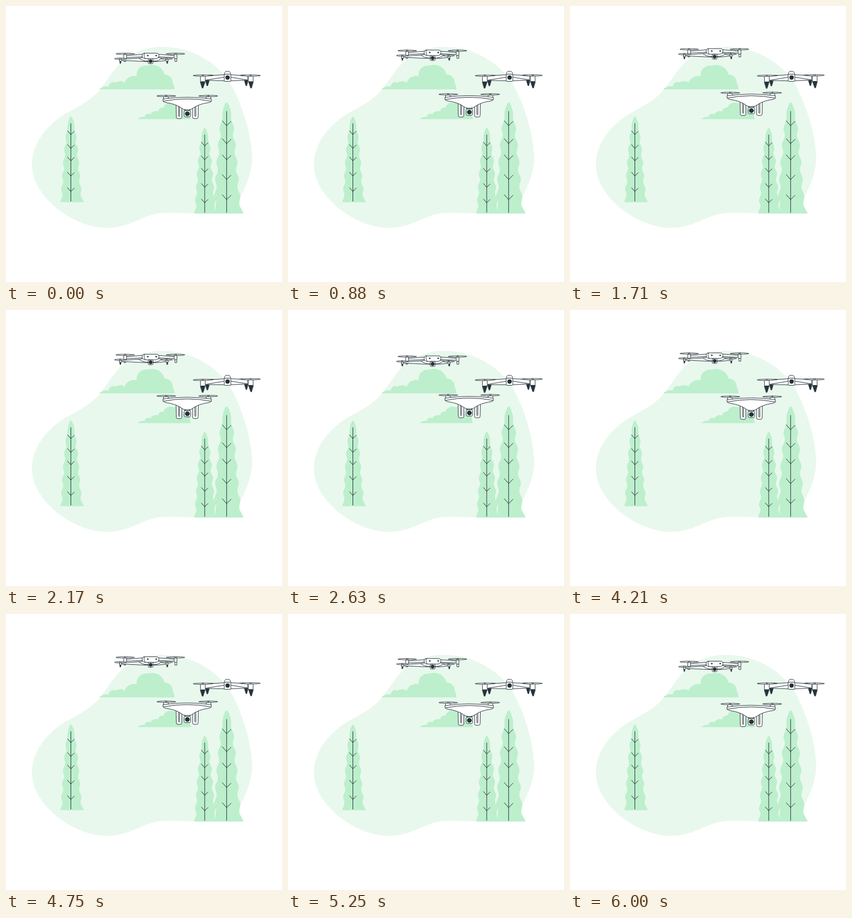
Animation, 500 px wide and 500 px high, one loop 6.04 s. Source, as an HTML page:

```html
<!DOCTYPE html>
<html lang="en">
<head>
<meta charset="utf-8">
<title>Drones</title>
<style>
  html, body { margin: 0; width: 100%; height: 100%; overflow: hidden; background: #fff; }
  svg { display: block; width: 100vw; height: 100vh; }
  .leaf { fill: #bdefcd; }
  .line { fill: none; stroke: #263238; stroke-width: 1; stroke-linecap: round; stroke-linejoin: round; }
  .drone { fill: #fff; stroke: #263238; stroke-width: .95; stroke-linecap: round; stroke-linejoin: round; }
  .dark { fill: #263238; }
  .blade { stroke-width: .9; }
</style>
</head>
<body>
<svg viewBox="0 0 500 500">
  <path fill="#e8f8ed" d="M283 74C345 74 392 112 410 146C431 186 446 240 446 274C446 298 438 319 427 341C415 364 400 376 378 376C345 377 300 373 275 376C245 380 225 402 182 402C125 402 47 348 47 287C47 248 76 214 108 195C133 181 152 172 168 154C186 133 196 110 218 94C236 81 258 74 283 74Z"/>
  <path class="leaf" d="M169 151C174 146 180 144 186 146C187 139 193 136 199 139C204 135 212 136 215 139C217 131 227 125 237 127C235 116 244 107 255 108C268 104 284 109 287 124C296 124 303 132 302 140C304 143 306 147 305 151Z"/>
  <path class="leaf" d="M238 205C242 201 247 200 251 201C252 196 257 194 262 196C264 191 271 189 276 191C276 186 281 183 286 184C287 177 295 173 303 176C312 174 321 180 321 188C329 187 335 193 333 199L335 205Z"/>
  <g id="trees"></g>
  <path fill="none" stroke="#e8f8ed" stroke-width="1.6" d="M381 353Q377 361 380 368"/>
  <g id="front" class="drone"></g>
  <g id="side" class="drone"></g>
  <g id="back" class="drone"></g>
</svg>
<script>
const LOOP = 6040;
const CYCLE = 6000;
const byId = id => document.getElementById(id);

const path = (d, cls = '') => `<path class="${cls}" d="${d}"/>`;
const box = (x, y, w, h, r = 0, cls = '') =>
  `<rect class="${cls}" x="${x}" y="${y}" width="${w}" height="${h}" rx="${r}"/>`;
const dot = (x, y, r) => `<circle class="dark" cx="${x}" cy="${y}" r="${r}"/>`;
const blade = (x, y, half) =>
  `<ellipse class="blade" cx="${x}" cy="${y}" rx="${half}" ry="1.2"/>` + box(x - 1.5, y - 1, 3, 2, .8);
const camera = (x, y, size, r) =>
  box(x - size / 2, y - size / 2, size, size, 2) + dot(x, y, r);
const mirror = (axis, shape) => shape + `<g transform="translate(${2 * axis} 0) scale(-1 1)">${shape}</g>`;

// A wavy cypress with a trunk and V-shaped twigs; its foot flares to the right.
function tree(x, top, scale) {
  const height = 155.5;
  const left = [], right = [];
  for (let i = 0; i <= 78; i++) {
    const p = i / 78;
    const y = (top + p * height * scale).toFixed(1);
    const spread = Math.sqrt(p);
    const wave = 1.5 * Math.min(1, p * 4) * Math.sin(p * 41 - 1.5);
    left.unshift(`${(x - (17.5 * spread + wave) * scale).toFixed(1)} ${y}`);
    right.push(`${(x + (18.5 * spread + 3.5 * p ** 10 + wave) * scale).toFixed(1)} ${y}`);
  }
  const twigs = [33, 58, 80.5, 108, 136].map(dy => {
    const y = top + dy * scale;
    return `M${x - 6 * scale} ${y - 6.8 * scale}L${x} ${y}L${x + 6 * scale} ${y - 6 * scale}`;
  }).join('');
  return path('M' + right.concat(left).join('L') + 'Z', 'leaf') +
    path(`M${x} ${top + 13 * scale}V${top + height * scale - 2}${twigs}`, 'line');
}

const backDrone =
  path('M218 90L248 87.5V92L218 93.5ZM306 90L276 87.5V92L306 93.5Z') +
  mirror(261.5, box(213.3, 87.5, 5, 8, 1) + path('M214 95.5H217V100.5H214Z') + blade(215.8, 86.6, 16.8)) +
  path('M209 96.5L243 94.5L249 93H274L281 94.5L292 96.5V98.5L275 100.5H249L209 98.5Z') +
  path('M241 94.8Q246 99.5 257 100M282 94.8Q277 99.5 267 100') +
  box(205.5, 96, 4, 4.5, 1) + box(206.3, 100, 1.7, 4, .5, 'dark') +
  box(289.8, 96, 4, 4.5, 1) + box(291.3, 100, 1.7, 4, .5, 'dark') +
  blade(207, 95.5, 10.5) + blade(291, 95.5, 10.5) +
  path('M250 85.5H273Q277.5 86 277 90.5Q276.5 95 272 95.5H252Q247 95 246.5 90Q246.5 86 250 85.5Z') +
  path('M251 86Q248.5 90 252 95') +
  dot(256.8, 89.8, 1) + dot(272, 89.8, 1) +
  camera(262, 100, 9, 3.1);

const sideDrone =
  mirror(400,
    blade(371, 126.3, 9) +
    box(362.5, 127, 5.5, 8.5, .7) +
    path('M361.8 135.5H368L365.3 144.5H364.3Z', 'dark')) +
  path('M361 126.5L396 124.5H406L438 126.5V134.5L407 135.5H395L361 134.5Z') +
  path('M363 134L395 129M437 134L407 129') +
  mirror(400,
    box(352.3, 126.5, 8.7, 10.5, .7) +
    path('M352.3 137.5H360.5L356.8 148.7H355.6Z', 'dark') +
    blade(356.8, 126, 17.8)) +
  path('M395.5 124V122.5Q396 118.3 401.3 118.2Q406.6 118.3 407 122.5V124Z') +
  box(395.3, 123.5, 12, 13, 1.2) + dot(401.4, 129.6, 3.6);

const frontDrone =
  mirror(328.3,
    box(285.5, 164, 8.5, 6, .8) + blade(290.2, 163, 17) +
    path('M308.5 178H318.5V201.5Q318.5 204 316 204H311Q308.5 204 308.5 201.5Z') +
    box(312.6, 180, 2, 20, 1)) +
  path('M284.7 168.5Q328 162 372 168.5V172.5Q371 174.5 367 175Q349 177.5 338 185.5L334 188H323L319 185.5Q308 177.5 290 175Q285.500 174.500 284.700 172.500Z') +
  path('M284.9 172.5Q328 164 371.8 172.5', 'line') +
  path('M324 187V190H333V187', 'line') +
  camera(328.5, 195.2, 11.4, 3.8);

byId('trees').innerHTML = tree(117.5, 200, 1) + tree(360, 220.5, 1) + tree(399.7, 174, 1.3);
byId('back').innerHTML = backDrone;
byId('side').innerHTML = sideDrone;
byId('front').innerHTML = frontDrone;

// Triangle wave: 0 to 1 and back in one period.
function swing(time, period) {
  const p = time / period % 1;
  return 1 - Math.abs(2 * p - 1);
}

function draw(time) {
  const lift = (id, amount) => byId(id).setAttribute('transform', `translate(0 ${-amount})`);
  lift('back', 9.6 * swing(time, CYCLE / 2));
  lift('front', 10 * swing(time, CYCLE));
  byId('side').setAttribute('transform', `rotate(${-swing(time, CYCLE)} 400 132)`);
}

const start = performance.now();
function tick() {
  draw((performance.now() - start) % LOOP);
  requestAnimationFrame(tick);
}
draw(0);
requestAnimationFrame(tick);
</script>
</body>
</html>
```
